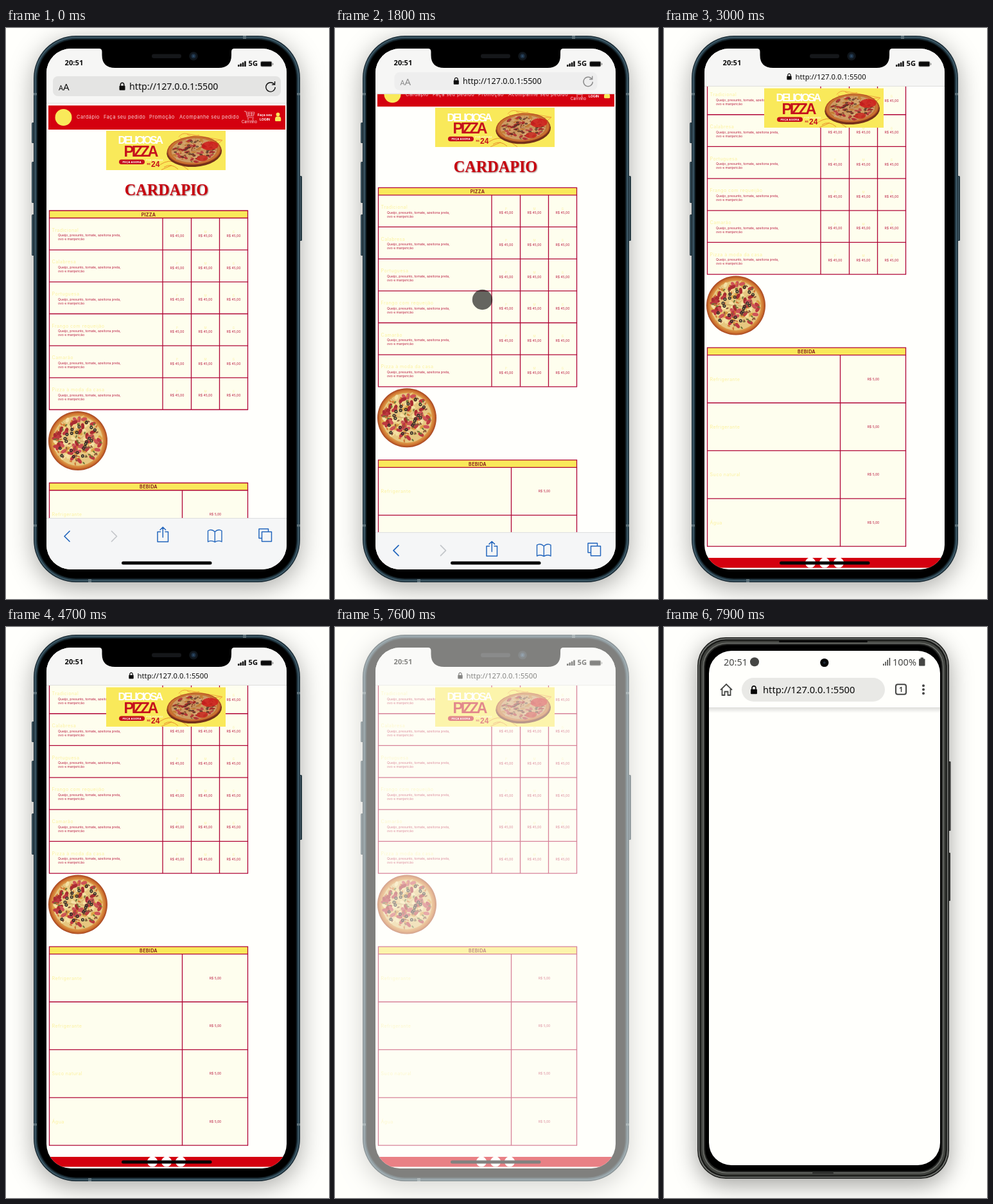
These frames come from a looping animation (503 by 888 pixels, 8000 ms). An HTML page with a canvas:

```html
<!DOCTYPE html>
<html lang="pt-BR">
<head>
<meta charset="utf-8">
<title>Cardápio no celular</title>
<style>
html, body { margin: 0; width: 100%; height: 100%; overflow: hidden; background: #fffffc; }
canvas { display: block; width: 100vw; height: 100vh; }
</style>
</head>
<body>
<canvas id="stage" width="503" height="888"></canvas>
<script>
const ctx = document.getElementById('stage').getContext('2d');
const W = 503, H = 888, LOOP = 8000, STEP = 100;
const BG = '#fffffc', RED = '#d4000f', LINE = '#b00537', YELLOW = '#f9e95a', PALE = '#fbf1a0';
const UI = '"Noto Sans", "Open Sans", sans-serif';
const SANS = 'Inter, sans-serif';
const HEAVY = '"Liberation Sans", Arial, sans-serif';
const URL_TEXT = 'http://127.0.0.1:5500';
const FULL = Math.PI * 2;

function box(x, y, w, h, r, fill) {
  ctx.beginPath();
  ctx.roundRect(x, y, w, h, r);
  ctx.fillStyle = fill;
  ctx.fill();
}

function dot(x, y, r, fill) {
  ctx.beginPath();
  ctx.arc(x, y, r, 0, FULL);
  ctx.fillStyle = fill;
  ctx.fill();
}

function line(points, color, width = 1) {
  ctx.beginPath();
  points.forEach(([x, y], i) => i ? ctx.lineTo(x, y) : ctx.moveTo(x, y));
  ctx.strokeStyle = color;
  ctx.lineWidth = width;
  ctx.stroke();
}

function path(d, color, width) {
  ctx.strokeStyle = color;
  ctx.lineWidth = width;
  ctx.stroke(new Path2D(d));
}

function text(str, x, y, font, color, align = 'left', spacing = 0) {
  ctx.font = font;
  ctx.fillStyle = color;
  ctx.textAlign = align;
  ctx.letterSpacing = spacing + 'px';
  ctx.fillText(str, x, y);
  ctx.letterSpacing = '0px';
}

function group(draw, alpha = 1, dx = 0, dy = 0) {
  ctx.save();
  ctx.globalAlpha *= alpha;
  ctx.translate(dx, dy);
  draw();
  ctx.restore();
}

function clip(x, y, w, h, r) {
  ctx.beginPath();
  ctx.roundRect(x, y, w, h, r);
  ctx.clip();
}

function random(seed) {
  return () => (seed = (seed * 16807) % 2147483647) / 2147483647;
}

// Linear interpolation through [time, value] pairs.
function track(keys, t) {
  if (t <= keys[0][0]) return keys[0][1];
  for (let i = 1; i < keys.length; i++) {
    const [t0, a] = keys[i - 1], [t1, b] = keys[i];
    if (t <= t1) return a + (b - a) * (t - t0) / (t1 - t0);
  }
  return keys[keys.length - 1][1];
}

const scrollAt = t => track([[1700, 0], [1800, 35.7], [1900, 138], [2000, 210.4]], t);
const phoneAlpha = t => track([[7400, 1], [7500, 0.88], [7600, 0.5], [7700, 0.09], [7800, 0]], t);
const nextAlpha = t => track([[7700, 0], [7800, 0.5], [7900, 1]], t);

function lock(x, y, s, color) {
  group(() => {
    ctx.scale(s, s);
    box(-4.5, -1.5, 9, 7, 1, color);
    path('M-2.7 -1V-3.2A2.7 2.7 0 0 1 2.7 -3.2V-1', color, 1.5);
  }, 1, x, y);
}

function pizza(r, count, seed) {
  const rnd = random(seed);
  const crust = ctx.createRadialGradient(0, 0, r * 0.7, 0, 0, r);
  crust.addColorStop(0, '#e9c982');
  crust.addColorStop(0.4, '#e0a550');
  crust.addColorStop(0.75, '#cf7430');
  crust.addColorStop(1, '#a4421f');
  dot(0, 0, r, crust);
  dot(0, 0, r * 0.84, '#e6c780');
  const place = (colors, n, size, ratio) => {
    for (let i = 0; i < n; i++) {
      const d = Math.sqrt(rnd()) * r * 0.8, a = rnd() * FULL;
      ctx.beginPath();
      ctx.ellipse(d * Math.cos(a), d * Math.sin(a), r * size, r * size * ratio, rnd() * 3, 0, FULL);
      ctx.fillStyle = colors[i % colors.length];
      ctx.fill();
    }
  };
  place(['#f4e0a2', '#dba043', '#f0d58c'], count, 0.09, 0.6);
  place(['#bd3940', '#cf5357', '#a92b31'], count * 0.55, 0.105, 0.55);
  place(['#6b7838', '#8b5639', '#d77736'], count * 0.8, 0.05, 0.5);
  for (let i = 0; i < 22; i++) {
    const d = r * (0.25 + 0.5 * rnd()), a = i * 2.4;
    ctx.beginPath();
    ctx.arc(d * Math.cos(a), d * Math.sin(a), r * 0.038, 0, FULL);
    ctx.strokeStyle = '#35302b';
    ctx.lineWidth = r * 0.035;
    ctx.stroke();
  }
  for (let i = 0; i < 4; i++) {
    const a = i * Math.PI / 4 + 0.1, x = r * 0.85 * Math.cos(a), y = r * 0.85 * Math.sin(a);
    line([[-x, -y], [x, y]], 'rgba(140,75,30,.45)', r * 0.015);
  }
}

function nav() {
  box(66, 120.5, 369, 37.5, 0, RED);
  dot(89.5, 139, 13, YELLOW);
  const items = [['Cardápio', 110], ['Faça seu pedido', 152], ['Promoção', 223], ['Acompanhe seu pedido', 270]];
  for (const [label, x] of items) text(label, x, 141.3, '7.5px ' + SANS, '#f8d3d5', 'left', 0.45);
  path('M371 129.5H373.5L376 139H386M373.8 131H387L385.5 136.5H375.3M378 131V136.5M382.5 131V136.5M374.5 133.7H386', '#f0a4aa', 0.9);
  dot(377, 141.5, 1, '#f0a4aa');
  dot(384.5, 141.5, 1, '#f0a4aa');
  text('Carrinho', 379, 148, '5.6px ' + SANS, '#fff', 'center', 0.15);
  text('Faça seu', 403, 137, 'bold 5.2px ' + SANS, '#fff', 'center');
  text('LOGIN', 403, 144, 'bold 5.2px ' + SANS, '#fff', 'center');
  dot(423.5, 134.4, 2.9, YELLOW);
  box(419, 137.5, 9.2, 7.5, [4, 4, 1.5, 1.5], YELLOW);
}

function banner(y) {
  group(() => {
    clip(0, 0, 186, 61.5, 0);
    box(0, 0, 186, 61.5, 0, YELLOW);
    path('M113 10Q118 3 126 5L181 15M115 11L135 21M126 6Q150 20 181 15L164 29M133 9L145 7M170 20L178 34', '#f0a23c', 1);
    path('M84 53Q98 44 110 50T128 61M90 57Q101 50 112 60M86 61L102 54', '#e9912e', 1);
    text('DELICIOSA', 18.5, 20.8, 'bold 17px ' + HEAVY, '#fff', 'left', -2.75);
    text('PIZZA', 27.5, 40, 'bold 23.5px ' + HEAVY, '#c5101d', 'left', -3.5);
    box(20, 45, 40, 7.5, 3.75, '#c5101d');
    text('PEÇA AGORA', 40, 50.5, 'bold 4.3px ' + HEAVY, '#fff', 'center');
    text('POR APENAS', 62, 47, 'bold 4px ' + HEAVY, '#fff8bd');
    text('R$', 63.5, 53, 'bold 4px ' + HEAVY, '#c5101d');
    text('24', 70, 56.5, 'bold 12px ' + HEAVY, '#c5101d');
    group(() => {
      ctx.rotate(-0.06);
      ctx.scale(1, 0.53);
      dot(0, 5, 43, '#74301a');
      pizza(42, 60, 71);
      ctx.globalAlpha = 0.28;
      dot(0, 0, 38, '#8e2a16');
      ctx.globalAlpha = 0.85;
      dot(25, -11, 13, '#cf1c1c');
      dot(12, 24, 9, '#c82a22');
    }, 1, 137, 31);
  }, 1, 156, y);
}

// Draws a titled grid; cell(i, top) fills in each row.
function table(title, top, cols, rows, pitch, cell) {
  const left = cols[0], right = cols[cols.length - 1];
  const body = top + 11.5, bottom = body + pitch * rows;
  box(left, top, right - left, bottom - top, 0, '#fefeee');
  box(left, top, right - left, 11.5, 0, YELLOW);
  for (const x of cols) {
    const y = x === left || x === right ? top : body;
    line([[x, y], [x, bottom]], LINE, 1.3);
  }
  line([[left - 0.6, top], [right + 0.6, top]], LINE, 1.3);
  for (let i = 0; i <= rows; i++) {
    const y = body + pitch * i;
    line([[left - 0.6, y], [right + 0.6, y]], LINE, 1.3);
  }
  text(title, (left + right) / 2, top + 8.8, '600 7.2px ' + SANS, '#7c0c18', 'center', 0.3);
  for (let i = 0; i < rows; i++) cell(i, body + pitch * i);
}

const FLAVOURS = ['Tradicional', 'Calabresa', 'Portuguesa', 'Frango com requeijão', 'Camarão', 'Pizza à moda da casa'];
const DRINKS = ['Refrigerante', 'Refrigerante', 'Suco natural', 'Água'];
const SMALL = '5.1px ' + SANS, NAME = '7.2px ' + SANS, INK = '#b91a40';

function page() {
  nav();
  group(() => {
    ctx.shadowColor = 'rgba(90,20,20,.6)';
    ctx.shadowBlur = 2;
    ctx.shadowOffsetX = ctx.shadowOffsetY = 1;
    text('CARDAPIO', 250, 260, 'bold 24.2px "Liberation Serif", serif', '#c8000e', 'center');
  });
  table('PIZZA', 284, [67.5, 244, 288.5, 332.5, 376.5], 6, 49.67, (i, y) => {
    text(FLAVOURS[i], 71.5, y + 21.3, NAME, PALE, 'left', 0.4);
    text('Queijo, presunto, tomate, azeitona preta,', 81, y + 28.8, SMALL, INK);
    text('ovo e manjericão', 81, y + 34.8, SMALL, INK);
    ['P', 'M', 'G'].forEach((size, k) => {
      const x = 266.5 + 44 * k;
      text(size, x, y + 23, '4.5px ' + SANS, PALE, 'center');
      text('R$ 45,00', x, y + 29.4, SMALL, INK, 'center');
    });
  });
  group(() => pizza(46, 80, 23), 1, 112, 642);
  table('BEBIDA', 707.5, [67.5, 274.5, 376.5], 4, 74.4, (i, y) => {
    text(DRINKS[i], 71.5, y + 40, NAME, PALE, 'left', 0.4);
    text('R$ 5,00', 326, y + 39, SMALL, INK, 'center');
  });
  box(63, 1034.4, 374, 15.6, 0, RED);
  for (const x of [228, 250, 272]) dot(x, 1042, 8, '#fff');
}

function addressBar(p, bottom) {
  box(63, 32, 374, bottom - 32, 0, '#f6f6f5');
  line([[63, bottom - 0.5], [437, bottom - 0.5]], '#dededc');
  group(() => {
    box(73 + 35 * p, 75 - 11 * p, 355 - 70 * p, 31 - 5.5 * p, 8, '#e4e4e3');
    group(() => {
      text('A', 0, 0, '11px ' + UI, '#111');
      text('A', 7, 0, '15px ' + UI, '#111');
    }, 1, 82 + 35 * p, 96.5 - 14 * p);
    group(() => {
      path('M6 -3.6A7.2 7.2 0 1 0 7.2 0.5M2 -3.4H6.6V-8.4', '#111', 1.4);
    }, 1, 412 - 32 * p, 91.5 - 15 * p);
  }, 1 - p);
  const y = 91.2 - 15.2 * p;
  lock(181 + 14 * p, y, 1 - 0.18 * p, '#0c0c0c');
  text(URL_TEXT, 192 + 12.5 * p, y + 5 - p, `${14.2 - 2.9 * p}px ${UI}`, '#0c0c0c');
}

function toolbar(dy) {
  group(() => {
    const blue = '#2366bd';
    box(63, 762, 374, 82, 0, '#f5f6f7');
    line([[63, 762.5], [437, 762.5]], '#dddedf');
    ctx.lineCap = ctx.lineJoin = 'round';
    path('M99 782.5L91 790.5L99 798.5', blue, 1.7);
    path('M164.5 782.5L172.5 790.5L164.5 798.5', '#c3c6ca', 1.7);
    path('M240.5 783.5H236V799H252.5V783.5H248M244.3 792V776.5M240 780.5L244.3 776.3L248.6 780.5', blue, 1.5);
    path('M325.3 783.5Q320 778.5 314.5 782V799Q320 796 325.3 799.5Q330.5 796 336 799V782Q330.5 778.5 325.3 783.5V799.5', blue, 1.4);
    path('M398 793.5H394V779H408.5V783M398.5 783.5H413.5V798.5H398.5Z', blue, 1.5);
  }, 1, 0, dy);
}

function iphoneBody() {
  for (const [x, y, h] of [[40, 147, 32], [40, 208, 64], [40, 290, 64], [457, 230, 101]]) {
    box(x, y, 4, h, 1.5, '#29404c');
    box(x + 1, y + 1, 1, h - 2, 0, '#5b7684');
  }
  group(() => {
    ctx.shadowColor = 'rgba(0,0,0,.34)';
    ctx.shadowBlur = 38;
    ctx.shadowOffsetY = 9;
    box(43, 12, 415, 850, 66, '#192a34');
  });
  box(44.5, 13.5, 412, 847, 64.5, '#45616f');
  box(46, 15, 409, 844, 63, '#263d49');
  box(48, 17, 405, 840, 61, '#0c1418');
  box(49.5, 18.5, 402, 837, 59.5, '#000');
  for (const x of [43, 453]) for (const y of [101, 772]) box(x, y, 5, 3.5, 0, '#5c7079');
  box(369, 12, 5, 5, 0, '#5c7079');
  box(128, 857, 5, 5, 0, '#5c7079');
}

function iphone(t) {
  const s = scrollAt(t), p = Math.min(1, s / 64);
  const bottom = 117.5 - 26.5 * p;
  iphoneBody();
  group(() => {
    clip(63, 32, 374, 810, 38);
    ctx.fillStyle = BG;
    ctx.fillRect(63, 32, 374, 810);
    group(page, 1, 0, -s);
    banner(Math.max(159.5 - s, bottom + 2.5));
    addressBar(p, bottom);
    if (p < 1) toolbar(80 * p ** 2.2);
    box(180, 829.5, 140.5, 5, 2.5, '#050505');
    text('20:51', 91.5, 58, 'bold 11.2px ' + UI, '#0a0a0a');
    for (let i = 0; i < 4; i++) box(361 + 3.4 * i, 57 - 1.8 * i, 2.5, 3 + 1.8 * i, 0.5, '#0a0a0a');
    text('5G', 377.5, 59.3, 'bold 11.2px ' + UI, '#0a0a0a');
    box(396, 51.5, 18.5, 9, 2.4, '#9b9b99');
    box(397, 52.5, 16.5, 7, 1.5, '#0a0a0a');
    box(415, 54.5, 1.3, 3, 0.6, '#8b8b89');
    ctx.fillStyle = '#000';
    ctx.fill(new Path2D('M145 31V32Q149.5 32 149.5 37V42Q149.5 62 170 62H331Q351 62 351 42V37Q351 32 355.5 32V31Z'));
  });
  box(227, 40.5, 46, 6.5, 3.2, '#15171a');
  dot(292, 43.7, 6.8, '#10161c');
  dot(292, 43.7, 3.6, '#1c2f42');
  dot(292, 43.7, 1.6, '#2d4a66');
  pointer(t);
}

function pointer(t) {
  if (t < 1200 || t >= 3000) return;
  const x = track([[1200, 180], [1300, 229.5], [2700, 229.5], [2900, 361.5]], t);
  const y = track([[1200, 216], [1300, 422.5], [2700, 422.5], [2900, 336]], t);
  dot(x, y, 15.7, 'rgba(0,0,0,.6)');
}

function android() {
  const grey = '#454644';
  box(442, 209, 4.5, 108, 1, '#3a3b39');
  box(442, 351, 4, 75, 1, '#3a3b39');
  group(() => {
    ctx.shadowColor = 'rgba(0,0,0,.38)';
    ctx.shadowBlur = 36;
    ctx.shadowOffsetY = 9;
    box(52, 16, 392, 842, 44, '#1d1e1c');
  });
  box(53.5, 17.5, 389, 839, 42.5, '#737572');
  box(55.3, 19.3, 385.4, 835.4, 41, '#161715');
  box(57.5, 21.5, 381, 831, 39, '#41433f');
  box(60.5, 24.5, 375, 825, 37, '#6c6e6a');
  box(62, 26, 372, 822, 36, '#242523');
  box(64, 28, 368, 818, 34, '#000');
  box(179, 21, 138, 3, 1.5, '#0b0b0b');
  box(231, 848, 33, 3, 1, '#343533');

  group(() => {
    clip(70, 37, 360, 800, 35);
    ctx.fillStyle = BG;
    ctx.fillRect(70, 37, 360, 800);
    const shade = ctx.createLinearGradient(0, 125, 0, 134);
    shade.addColorStop(0, 'rgba(0,0,0,.13)');
    shade.addColorStop(1, 'rgba(0,0,0,0)');
    box(70, 125, 360, 9, 0, shade);
  });

  text('20:51', 93, 60, '14.5px ' + UI, grey);
  dot(141, 54.3, 7, grey);
  dot(249.8, 55.5, 6.6, '#050607');
  dot(249.8, 55.5, 2, '#1d2833');
  for (let i = 0; i < 4; i++) box(341 + 3.2 * i, 57 - 3 * i, 1.6, 3 + 3 * i, 0, grey);
  text('100%', 356, 60, '14.5px ' + UI, grey);
  box(397, 49.5, 9.5, 11, 1, grey);
  box(399.5, 47.5, 4.5, 3, 0.5, grey);

  path('M88 97.8L97 89L106 97.8M90.5 96V106H94.5V100.5H99.5V106H103.5V96', grey, 1.8);
  box(121, 79, 223, 37, 18.5, '#e9e9e6');
  lock(140, 98.3, 1.1, '#050505');
  text(URL_TEXT, 154, 103, '14.7px ' + UI, '#0a0a0a');
  ctx.beginPath();
  ctx.roundRect(361, 89.3, 16, 15.5, 3);
  ctx.strokeStyle = grey;
  ctx.lineWidth = 2;
  ctx.stroke();
  text('1', 369, 101, 'bold 10.5px ' + UI, grey, 'center');
  for (const y of [91.2, 97.2, 103.2]) dot(404, y, 2, grey);
}

function veil(alpha) {
  group(() => {
    ctx.fillStyle = BG;
    ctx.fillRect(0, 0, W, H);
  }, 1 - alpha);
}

function render(now) {
  const t = Math.floor((now % LOOP) / STEP) * STEP;
  ctx.fillStyle = BG;
  ctx.fillRect(0, 0, W, H);
  if (t < 7800) {
    iphone(t);
    veil(phoneAlpha(t));
  } else {
    android();
    veil(nextAlpha(t));
  }
}

let start;
function tick(now) {
  start ??= now;
  render(Math.max(0, now - start));
  requestAnimationFrame(tick);
}
requestAnimationFrame(tick);
</script>
</body>
</html>
```
